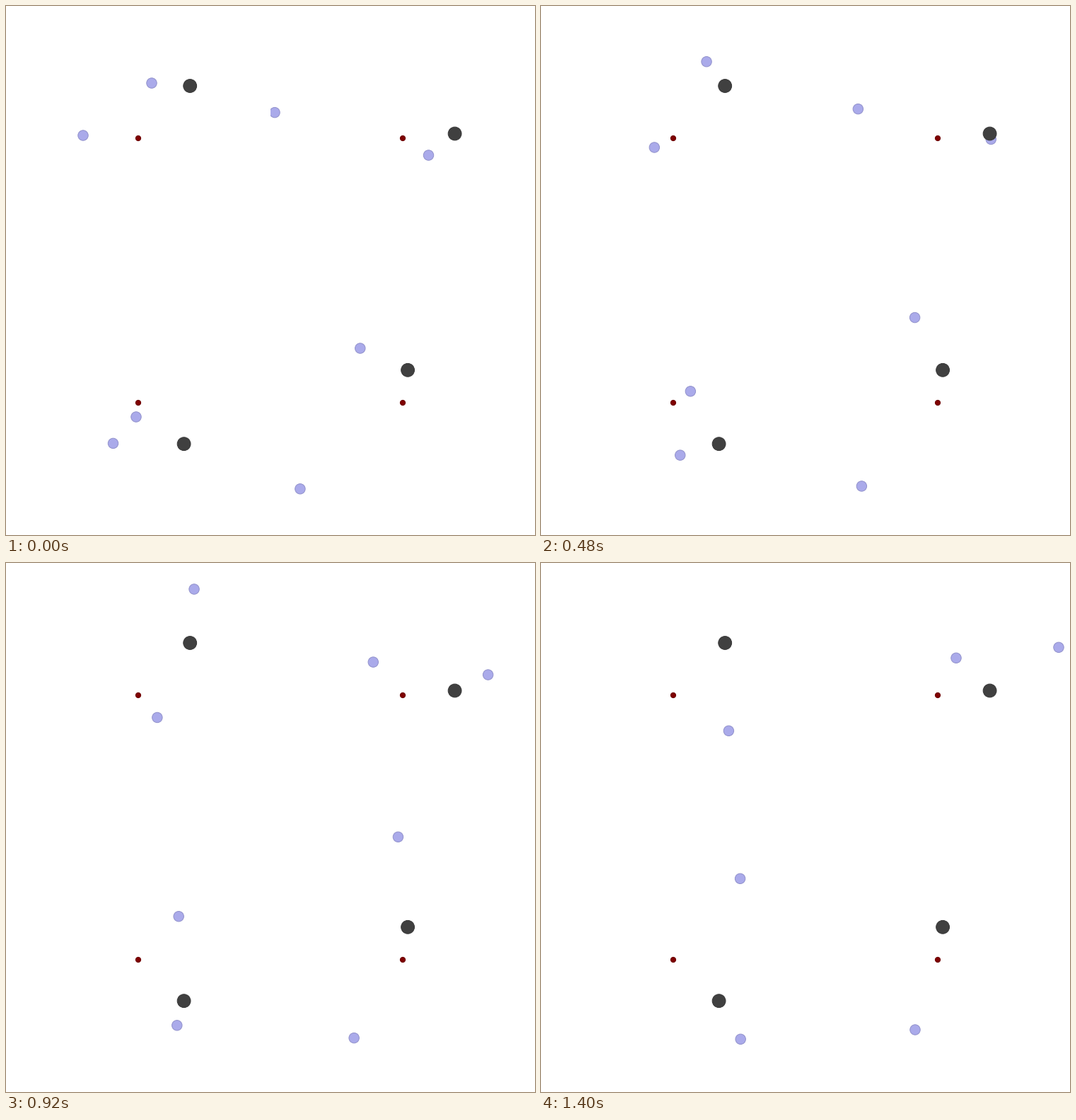
Recreate the animation shown at these times as a matplotlib script. Size 748 px wide and 748 px high, loop 1440 ms.

```python
import numpy as np
import matplotlib.pyplot as plt
from matplotlib.animation import FuncAnimation
from matplotlib.patches import Circle, Rectangle

SIZE, HALF, DPI = 748, 374, 100
FRAMES, INTERVAL = 36, 40
PX = 72 / DPI      # one pixel in points
DRAG = 0.72        # share of the speed lag kept per step

# Each particle follows a parabola: start, halfway point, end
ARCS = [
    [(206, 109), (253.8, 53.9), (300.5, -17)],
    [(109, 183), (194, 211.5), (265.4, 237.3)],
    [(380, 150.6), (493, 142.2), (587, 134.3)],
    [(597.5, 211), (664.1, 170.3), (732, 119.3)],
    [(500.8, 484), (545.3, 408.2), (575, 325.4)],
    [(184, 581), (231.4, 517.5), (281.6, 446.3)],
    [(151.5, 618.4), (225.4, 646.7), (282.2, 673.3)],
    [(415.9, 682.8), (477.8, 674.8), (529, 660)],
]
MASSES = [(260.2, 113), (634.6, 180.5), (251.6, 619.2), (568.1, 514.8)]
start, middle, end = np.array(ARCS).transpose(1, 0, 2)


def travel(n):
    """Distance covered after n steps when speeding up from rest."""
    return n - DRAG * (1 - DRAG ** n) / (1 - DRAG)


def positions(n):
    u = travel(n) / travel(FRAMES - 1)
    return (start * (1 - u) * (1 - 2 * u)
            + middle * 4 * u * (1 - u)
            + end * u * (2 * u - 1))


fig = plt.figure(figsize=(SIZE / DPI, SIZE / DPI), dpi=DPI, facecolor="white")
ax = fig.add_axes([0, 0, 1, 1])
ax.set_xlim(0, SIZE)
ax.set_ylim(SIZE, 0)
ax.axis("off")


def dot(center, radius, face, edge, z):
    return ax.add_patch(Circle(center, radius, facecolor=face, edgecolor=edge,
                               linewidth=PX, zorder=z))


def clip_to_panel(patch, point):
    corner = HALF * (point // HALF)
    patch.set_clip_path(Rectangle(corner, HALF, HALF, transform=ax.transData))


particles = []
for point in start:
    p = dot(point, 7.2, "#aaaaea", "#9292cc", 1)
    clip_to_panel(p, point)
    particles.append(p)

for center in MASSES:
    dot(center, 9.4, "#404040", "#383838", 2)

for x in (HALF / 2, HALF * 1.5):
    for y in (HALF / 2, HALF * 1.5):
        dot((x, y), 3.6, "#800000", "#6c0000", 3)


def update(n):
    for p, center in zip(particles, positions(n)):
        p.center = center
    return particles


anim = FuncAnimation(fig, update, frames=FRAMES, interval=INTERVAL,
                     repeat=True, repeat_delay=0, blit=False)
plt.show()
```
